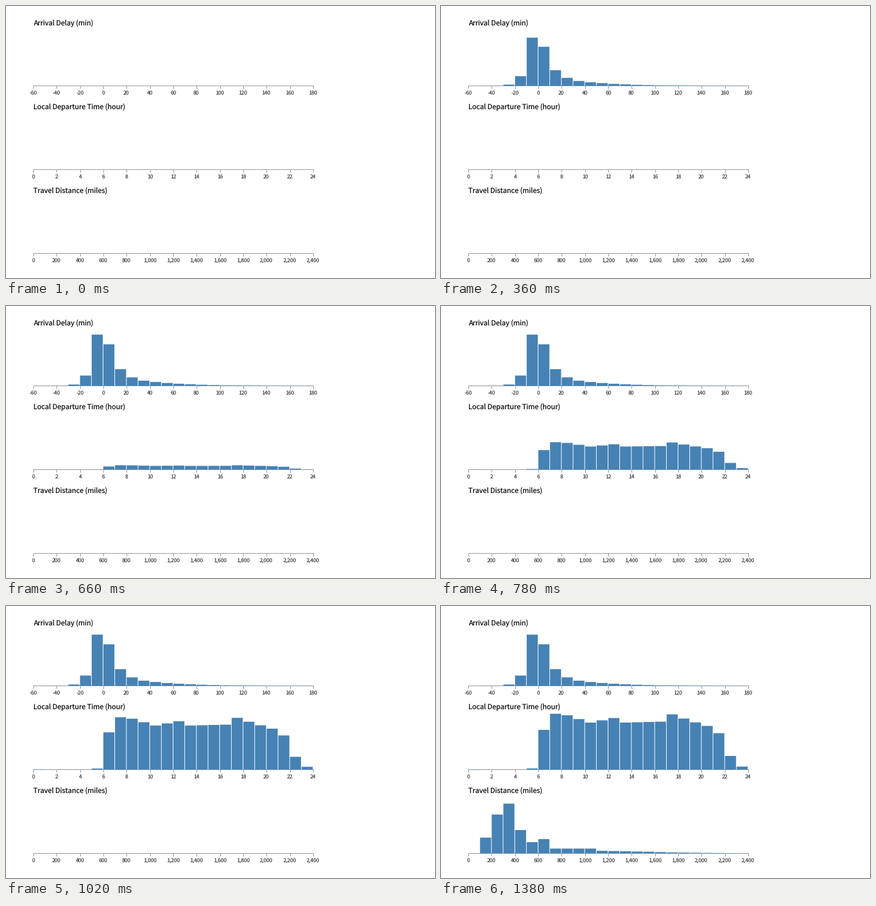
Animation, 705 px wide and 448 px high, one loop 1.6 s. Source, as a matplotlib script:

```python
import numpy as np
import matplotlib.pyplot as plt
from matplotlib.animation import FuncAnimation
from matplotlib.patches import Rectangle

W, H, DPI = 705, 448, 100
INTERVAL, LOOP = 20, 1600
LEFT, WIDTH, BINS = 45, 460, 24
STEP = WIDTH / BINS
FONT = "Noto Sans CJK JP"

plt.rcParams["text.hinting"] = "none"

# moments at which the page repaints
REPAINTS = [*range(280, 361, 20), 500, 640, 660, 720, 780,
            *range(980, 1021, 20), 1260, *range(1320, 1381, 20)]

# title, first label, label step, {bin: height}, {ms: progress}
CHARTS = [
    ("Arrival Delay (min)", -60, 20,
     {0: .05, 2: .2, 3: 2.2, 4: 17, 5: 84.5, 6: 68.5, 7: 27.5, 8: 14,
      9: 8.5, 13: 2.6, 16: .9, 23: .3},
     {280: .485, 360: .752, 640: .92}),
    ("Local Departure Time (hour)", 0, 2,
     {0: .5, 1: .1, 4: .1, 5: 2, 6: 65.5, 7: 92, 8: 89.5, 10: 77.5, 12: 85,
      13: 77.5, 16: 79, 17: 91, 20: 72, 21: 60, 22: 22.5, 23: 5},
     {660: .27, 780: .497, 980: .523, 1020: .75, 1260: 1}),
    ("Travel Distance (miles)", 0, 200,
     {0: .02, 1: 26, 2: 64, 3: 82, 4: 38.5, 5: 18.5, 6: 23.5, 7: 8,
      10: 8, 11: 4.3, 15: 2.8, 23: .4},
     {1320: .4, 1380: 1}),
]


def curve(points):
    """Bar heights, interpolated on a log scale."""
    return np.exp(np.interp(range(BINS), list(points),
                            np.log(list(points.values()))))


def ease(t):
    """Cubic in and out."""
    return 4 * t ** 3 if t < .5 else 1 - 4 * (1 - t) ** 3


def growth(progress, ms):
    """Bar scale at the latest repaint."""
    shown = max((r for r in REPAINTS if r <= ms), default=0)
    return ease(np.interp(shown, list(progress), list(progress.values()),
                          left=0))


def px(size):
    return size * 72 / DPI


fig = plt.figure(figsize=(W / DPI, H / DPI), dpi=DPI, facecolor="white")
ax = fig.add_axes([0, 0, 1, 1])
ax.set(xlim=(0, W), ylim=(H, 0))
ax.axis("off")


def line(xs, ys):
    ax.plot(xs, ys, color="#999999", lw=px(1), solid_capstyle="butt",
            snap=False, zorder=1)


def draw_axis(title, base, first, step):
    ax.text(LEFT, base - 99.5, title, family=FONT, size=px(11.5),
            color="#111111", va="baseline")
    line([LEFT, LEFT + WIDTH + 1], [base, base])
    for i in range(BINS // 2 + 1):
        x = LEFT + .5 + round(2 * i * STEP)
        line([x, x], [base, base + 5])
        ax.text(x - .5, base + 14.8, f"{first + i * step:,}", family=FONT,
                size=px(8.6), color="#444444", ha="center", va="baseline")


def make_bars(base):
    bars = [Rectangle((LEFT + i * STEP, base), STEP - 1, 0, lw=0,
                      fc="steelblue", snap=False, zorder=2)
            for i in range(BINS)]
    for bar in bars:
        ax.add_patch(bar)
    return bars


groups = []
for row, (title, first, step, points, progress) in enumerate(CHARTS):
    base = 131.5 + 138 * row
    draw_axis(title, base, first, step)
    groups.append((make_bars(base), curve(points), progress))


def update(i):
    for bars, heights, progress in groups:
        scale = growth(progress, i * INTERVAL)
        for bar, height in zip(bars, heights):
            bar.set_height(-height * scale)
    return [bar for bars, _, _ in groups for bar in bars]


anim = FuncAnimation(fig, update, frames=LOOP // INTERVAL, interval=INTERVAL,
                     repeat=True, repeat_delay=0, blit=False)
plt.show()
```
